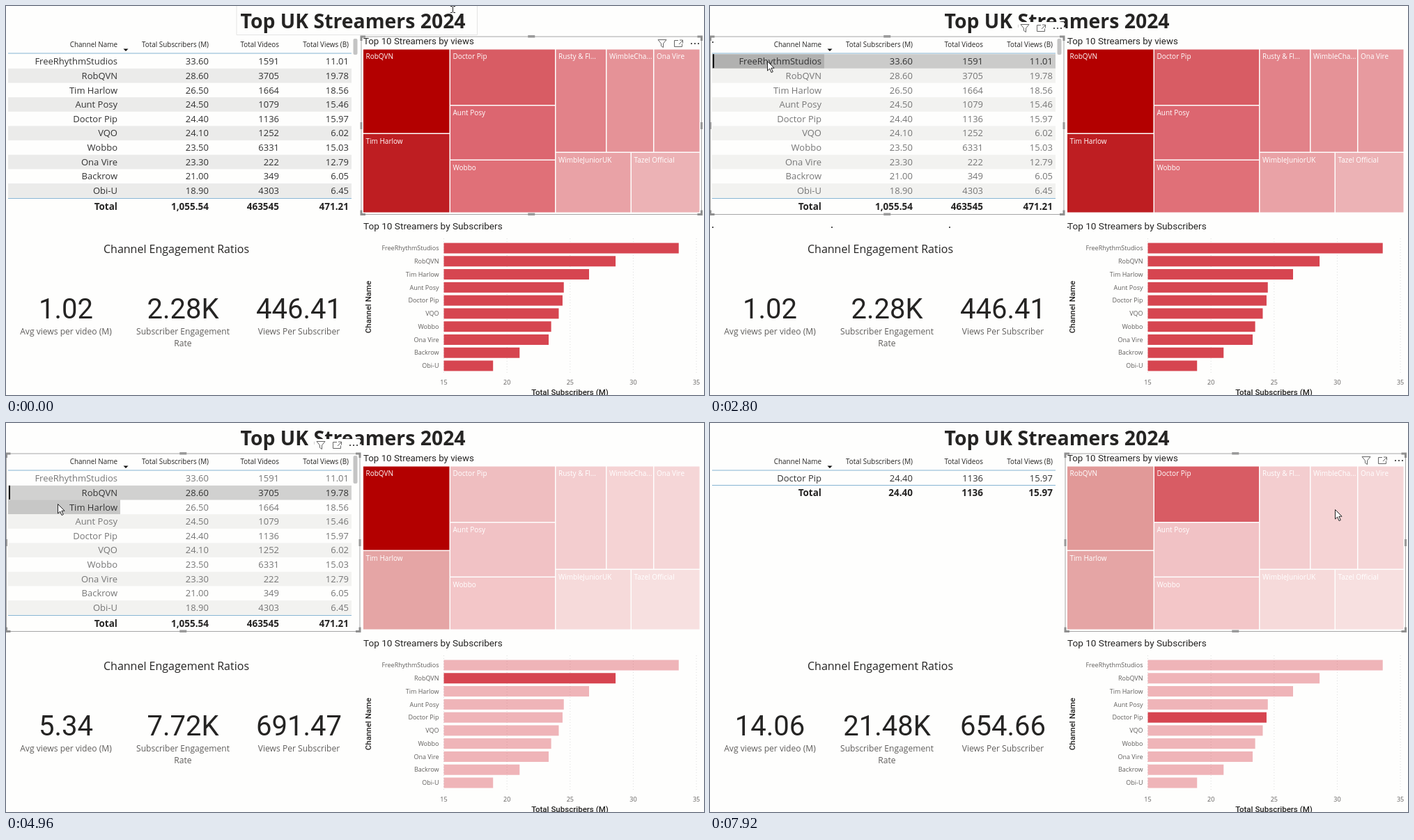
Animation of 1002x559 px, one loop 8000 ms. Source, as an HTML page:

```html
<!DOCTYPE html>
<html lang="en">
<head>
<meta charset="utf-8">
<title>Dashboard</title>
<style>
html, body { margin: 0; width: 100%; height: 100%; overflow: hidden; background: #fefefd; }
svg { display: block; width: 100vw; height: 100vh; font-family: "Open Sans", "Noto Sans", sans-serif; }
.din { font-family: Roboto, "Liberation Sans", sans-serif; }
.bold { font-weight: 700; }
.mid { font-weight: 500; }
</style>
</head>
<body>
<svg id="stage" viewBox="0 0 1002 559"></svg>
<script>
const LOOP = 8000, STEP = 80, INK = '#252423', BG = '#fefefd';

const rows = [
  ['FreeRhythmStudios', 33.6, 1591, 11.01], ['RobQVN', 28.6, 3705, 19.78],
  ['Tim Harlow', 26.5, 1664, 18.56], ['Aunt Posy', 24.5, 1079, 15.46],
  ['Doctor Pip', 24.4, 1136, 15.97], ['VQO', 24.1, 1252, 6.02],
  ['Wobbo', 23.5, 6331, 15.03], ['Ona Vire', 23.3, 222, 12.79],
  ['Backrow', 21, 349, 6.05], ['Obi-U', 18.9, 4303, 6.45]
];
// name, left, top, right, bottom, fill
const tiles = [
  ['RobQVN', 513, 62.5, 636.5, 182.5, '#b30000'], ['Tim Harlow', 513, 184, 636.5, 296.5, '#be1e22'],
  ['Doctor Pip', 638, 62.5, 788, 142, '#d85c64'], ['Aunt Posy', 638, 143.5, 788, 220.5, '#dc6670'],
  ['Wobbo', 638, 222, 788, 296.5, '#e07078'], ['Rusty & Fl...', 789.5, 62.5, 861, 209.5, '#e28289'],
  ['WimbleCha...', 862.5, 62.5, 929, 209.5, '#e59297'], ['Ona Vire', 930.5, 62.5, 995.5, 209.5, '#e79a9f'],
  ['WimbleJuniorUK', 789.5, 211, 896.5, 296.5, '#e9a2a6'], ['Tazel Official', 898, 211, 995.5, 296.5, '#ecb2b5']
];
const ratios = {
  '-1': ['1.02', '2.28K', '446.41'], 0: ['6.92', '21.12K', '327.72'], 1: ['5.34', '7.72K', '691.47'],
  2: ['11.15', '15.93K', '700.33'], 4: ['14.06', '21.48K', '654.66']
};
// time, value
const picks = [[0, -1], [2800, 0], [4000, 1], [5520, 2], [6720, -1]];
const filters = [[0, -1], [2960, 0], [4240, 1], [5760, 2], [6960, 4]];
const clicks = [2800, 4000, 5520, 6720];
// time, x, y of the pointer tip
const path = [
  [0, 641, 5], [160, 641, 5], [400, 660, 110], [800, 650, 320], [1120, 600, 326], [1280, 599, 326],
  [1600, 400, 400], [2000, 110, 150], [2320, 82, 79], [3360, 82, 79], [3520, 84, 92], [3600, 84, 93],
  [4720, 83, 95], [4880, 76, 107], [4960, 74, 116], [5200, 73, 118], [6240, 73, 118],
  [6400, 330, 112], [6720, 712, 100], [7440, 712, 110], [7600, 765, 178], [7760, 830, 165], [7920, 897, 124]
];

const rect = (x, y, w, h, fill, more = '') =>
  `<rect x="${x}" y="${y}" width="${w}" height="${h}" fill="${fill}" ${more}/>`;
const line = (d, color, more = '') => `<path d="${d}" fill="none" stroke="${color}" ${more}/>`;
const text = (x, y, s, size, anchor = 'start', fill = INK, more = '') =>
  `<text x="${x}" y="${y}" font-size="${size}" text-anchor="${anchor}" fill="${fill}" ${more}>${s}</text>`;

const DIN = 'class="din"', BOLD = 'class="bold"';
const lastIndex = (list, t) => list.filter(e => e[0] <= t).length - 1;

function pointer(t) {
  const i = lastIndex(path, t), a = path[i], b = path[i + 1];
  if (!b) return a.slice(1);
  const k = (t - a[0]) / (b[0] - a[0]);
  return [a[1] + (b[1] - a[1]) * k, a[2] + (b[2] - a[2]) * k];
}

function hoveredRow([x, y]) {
  const i = Math.floor((y - 69.2) / 20.65);
  return x < 497 && i >= 0 && i < 10 ? i : -1;
}

function toolbar(x, y) {
  return line(`M${x - 6} ${y - 5.5}h12l-4.5 5.5v5.5l-3 -2v-3.5z`, '#666') +
    line(`M${x + 23} ${y - 4.5}h-5.5v9h11v-4M${x + 24} ${y + 1}l5.5 -5.5M${x + 25} ${y - 5}h4.500v4.500`, '#666') +
    [42, 47, 52].map(d => rect(x + d - 1, y - 1, 2, 2, '#555')).join('');
}

function selection(l, r) {
  const top = 44, bottom = 299.5, cx = (l + r) / 2, cy = 172;
  const corner = (x, y, sx, sy) => line(`M${x + 6 * sx} ${y}H${x}V${y + 6 * sy}`, '#8f8f8f', 'stroke-width="3"');
  return line(`M${l} ${top}H${r}V${bottom}H${l}z`, '#a6a6a6') +
    corner(l, top, 1, 1) + corner(r, top, -1, 1) + corner(l, bottom, 1, -1) + corner(r, bottom, -1, -1) +
    [top, bottom].map(y => rect(cx - 5, y - 2, 10, 3.500, '#999')).join('') +
    [l, r].map(x => rect(x - 1.5, cy - 5, 3, 10, '#999')).join('');
}

function table(t, filter) {
  const single = filter === 4, pick = picks[lastIndex(picks, t)][1];
  const hover = single ? -1 : hoveredRow(pointer(t));
  const settled = hover === hoveredRow(pointer(Math.max(0, t - STEP)));
  const right = [160, 291, 392, 492];
  const shade = (x, y, w, a) => rect(x, y, w, 20.65, `rgba(0,0,0,${a})`);
  let out = ['Channel Name', 'Total Subscribers (M)', 'Total Videos', 'Total Views (B)']
    .map((s, i) => text(right[i], 58.5, s, 9.9, 'end')).join('');
  out += '<path d="M168.500 61.500h7l-3.500 3.500z" fill="#111"/>';
  (single ? [rows[4]] : rows).forEach((row, i) => {
    const y = 69.2 + i * 20.65, on = pick === i, over = hover === i;
    if (i % 2) out += rect(3, y, 493, 20.65, pick < 0 || on ? '#ebebea' : '#f2f2f0');
    if (on) out += shade(3, y, 493, .11);
    if (over) out += shade(3, y, settled ? 493 : 161, .1) + shade(3, y, 161, .13);
    if (on) out += rect(4, y, 2, 20, '#111');
    const cells = [row[0], row[1].toFixed(2), row[2], row[3].toFixed(2)];
    cells.forEach((s, c) => {
      const strong = pick < 0 || on || over && (settled || !c);
      out += text(right[c], y + 15, s, 13, 'end', strong ? '#333' : '#777');
    });
  });
  const totals = single ? ['Total', '24.40', '1136', '15.97'] : ['Total', '1,055.54', '463545', '471.21'];
  const end = single ? 89.5 : 276.5;
  out += totals.map((s, c) => text(right[c], end + (single ? 15.5 : 16.5), s, 13.5, 'end', INK, BOLD)).join('');
  out += line(`M3 68H496M3 ${end}H496`, '#86b4d2', 'stroke-width="1.2"');
  if (!single) out += rect(498.5, 47, 6, t < 2960 ? 23 : 40, '#c4c4c4', 'rx="2"');
  return out;
}

function charts(glow) {
  let out = text(513, 55, 'Top 10 Streamers by views', 13.3, 'start', INK, DIN);
  for (const [name, l, top, r, b, fill] of tiles)
    out += rect(l, top, r - l, b - top, fill, `opacity="${glow(name)}"`) + text(l + 3.5, top + 13.5, name, 10, 'start', '#fff');

  out += text(513, 320.5, 'Top 10 Streamers by Subscribers', 13.6, 'start', INK, DIN);
  for (let v = 15; v <= 35; v += 5) {
    const x = 628.5 + (v - 15) * 18.13;
    out += line(`M${x} 334V527`, '#dcdcdc', 'stroke-dasharray="1 3"') + text(x, 544, v, 9, 'middle', '#605e5c');
  }
  rows.forEach(([name, subs], i) => {
    const y = 348 + i * 18.78;
    out += text(621.5, y + 3.2, name, 9, 'end', '#605e5c') +
      rect(628.5, y - 7.5, (subs - 15) * 18.13, 15, '#d64550', `opacity="${glow(name)}"`);
  });
  return out + text(809.5, 559, 'Total Subscribers (M)', 11.5, 'middle', INK, 'class="din mid"') +
    text(0, 0, 'Channel Name', 11.5, 'middle', INK, 'class="din mid" transform="translate(524 432.5) rotate(-90)"');
}

function cards(filter) {
  const xs = [86, 254, 420.5];
  return text(244.5, 355, 'Channel Engagement Ratios', 16, 'middle') +
    ratios[filter].map((s, i) => text(xs[i], 449, s, 40, 'middle', INK, DIN)).join('') +
    ['Avg views per video (M)', 'Subscriber Engagement', 'Views Per Subscriber']
      .map((s, i) => text(xs[i], 472, s, 12.1, 'middle', '#605e5c')).join('') +
    text(xs[1], 489, 'Rate', 12.1, 'middle', '#605e5c');
}

function loadingDots(t) {
  const i = clicks.findLastIndex(c => c <= t);
  if (i < 0 || t >= filters[i + 1][0]) return '';
  const shift = t - clicks[i];
  return [[3, 52], [513, 52], [3, 318], [174, 318], [343, 318], [513, 318]]
    .map(([x, y]) => rect(x + shift * .8, y - 1, 2, 2, '#555')).join('');
}

function cursor(t) {
  const [x, y] = pointer(t);
  if (t < 240) return line(`M${x - 3} .5h2.500l1 1l1 -1h2.500M${x + .5} 1v8M${x - 3} 9.500h2.500l1 -1l1 1h2.500`, '#222');
  return `<path transform="translate(${x} ${y})" d="M.5 .5v13.500l3.200 -3l2.300 5.500l2.300 -1l-2.400 -5.300h4.200z" fill="#fff" stroke="#222"/>`;
}

function draw(t) {
  const f = lastIndex(filters, t), [since, filter] = filters[f];
  const before = f ? filters[f - 1][1] : -1;
  const k = Math.min(1, (t - since + STEP) / 160);
  const level = (pick, name) => pick < 0 || rows[pick][0] === name ? 1 : .4;
  const glow = name => level(before, name) * (1 - k) + level(filter, name) * k;
  const tableActive = t >= 2800 && t < 6720;
  const [x, y] = pointer(t);

  let out = text(498, 32, 'Top UK Streamers 2024', 28.4, 'middle', INK, BOLD);
  if (t < 240) out += line('M331 0V41.500H676.500V0', '#e4e4e4');
  out += table(t, filter) + cards(filter) + charts(glow);
  if (x > 509 && y > 308) out += line('M509.5 559V308.500H999.500V559', '#e4e4e4') + toolbar(942, 319);
  const tableHover = x < 509 && y > 44 && y < 300;
  if (tableActive || tableHover || t >= 6720 && t < 6960) out += rect(443, 23, 65, 20, BG) + toolbar(452, 32);
  if (tableActive) out += selection(.5, 508);
  else {
    if (tableHover) out += line('M.5 44H508V299.500H.5z', '#e4e4e4');
    out += selection(510, 998.5) + toolbar(942, 54);
  }
  return out + loadingDots(t) + cursor(t);
}

const stage = document.getElementById('stage');
let shown = -1;
function tick() {
  let step = Math.floor(performance.now() % LOOP / STEP);
  if (step % 5 === 1) step--; // every fifth step holds the picture
  if (step !== shown) {
    shown = step;
    stage.innerHTML = draw(step * STEP);
  }
  requestAnimationFrame(tick);
}
tick();
</script>
</body>
</html>
```
